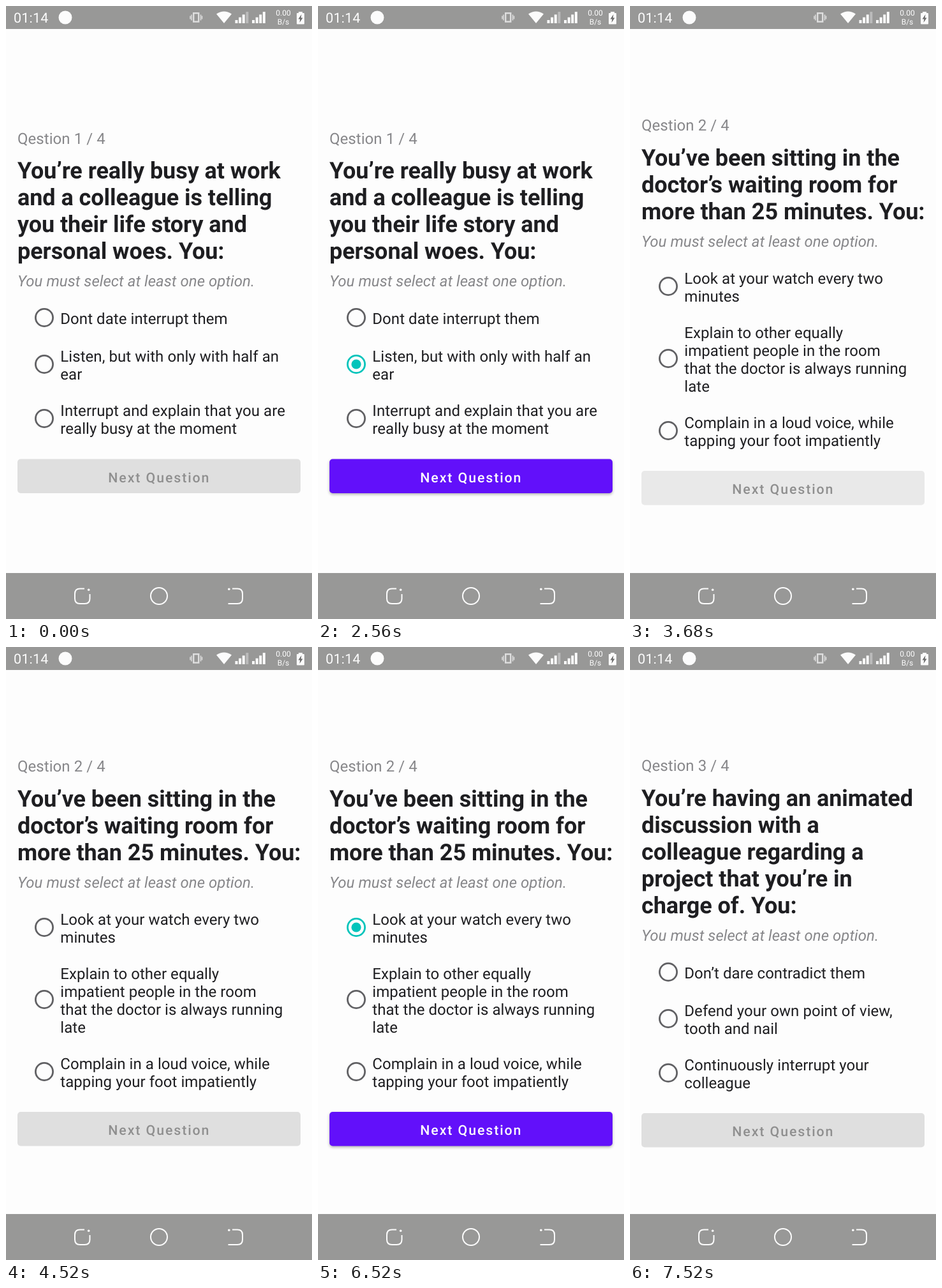
An HTML page with a canvas for the animation above (8 s loop, 480x960 px).

```html
<!DOCTYPE html>
<html lang="en">
<head>
<meta charset="utf-8">
<title>Quiz</title>
<style>
html, body { margin: 0; height: 100%; overflow: hidden; background: #fdfdfd; }
canvas { display: block; width: 480px; height: 960px; }
</style>
</head>
<body>
<canvas id="stage" width="480" height="960"></canvas>
<script>
const ctx = document.getElementById('stage').getContext('2d');
const LOOP = 8000, STEP = 40;
const PAPER = '#fdfdfd', INK = '#1e1e21', MUTED = '#87878a', BAR = '#989897';
const LIGHT = '#fcfcfc', TEAL = '#03c4bb', PURPLE = '#6210fa';

// start: shown from; pick: option tapped; press: button tapped
const questions = [
  { start: 0, label: 215.5, title: 270, button: 709.5,
    heading: ['You’re really busy at work', 'and a colleague is telling', 'you their life story and', 'personal woes. You:'],
    options: [
      [488, 'Dont date interrupt them'],
      [561, 'Listen, but with only with half an', 'ear'],
      [646, 'Interrupt and explain that you are', 'really busy at the moment']],
    pick: { option: 1, from: 2440, to: 2560 }, press: 3480 },
  { start: 3680, settled: 3840, label: 195, title: 250, button: 728,
    heading: ['You’ve been sitting in the', 'doctor’s waiting room for', 'more than 25 minutes. You:'],
    options: [
      [439, 'Look at your watch every two', 'minutes'],
      [552, 'Explain to other equally', 'impatient people in the room', 'that the doctor is always running', 'late'],
      [665, 'Complain in a loud voice, while', 'tapping your foot impatiently']],
    pick: { option: 0, from: 6280, to: 6360 }, press: 7320 },
  { start: 7440, settled: 7520, label: 194, title: 249, button: 730,
    heading: ['You’re having an animated', 'discussion with a', 'colleague regarding a', 'project that you’re in', 'charge of. You:'],
    options: [
      [509, 'Don’t dare contradict them'],
      [582, 'Defend your own point of view,', 'tooth and nail'],
      [667, 'Continuously interrupt your', 'colleague']] }
];

const progress = (t, from, to) => Math.min(1, Math.max(0, (t - from) / (to - from)));

function text(str, x, y, font, color, spacing = 0, align = 'left') {
  ctx.font = `${font} Roboto, sans-serif`;
  ctx.textRendering = 'geometricPrecision';
  ctx.letterSpacing = spacing + 'px';
  ctx.textAlign = align;
  ctx.fillStyle = color;
  ctx.fillText(str, x, y);
}

function box(x, y, w, h, color, r = 0) {
  ctx.fillStyle = color;
  ctx.beginPath();
  ctx.roundRect(x, y, w, h, r);
  ctx.fill();
}

function disc(x, y, r, color) {
  ctx.fillStyle = color;
  ctx.beginPath();
  ctx.arc(x, y, r, 0, 7);
  ctx.fill();
}

function stroke(path, color, width) {
  ctx.strokeStyle = color;
  ctx.lineWidth = width;
  ctx.stroke(new Path2D(path));
}

function ring(x, y, r, color, width) {
  ctx.strokeStyle = color;
  ctx.lineWidth = width;
  ctx.beginPath();
  ctx.arc(x, y, r, 0, 7);
  ctx.stroke();
}

function signal(x, faint) {
  for (let i = 0; i < 4; i++) {
    const h = 5 + i * 4.3;
    box(x + i * 5.6, 27 - h, 4, h, i === 3 && faint ? '#bbb' : LIGHT);
  }
}

function statusBar() {
  box(0, 0, 480, 36, BAR);
  text('01:14', 12, 26, '21.5px', LIGHT, 0.2);
  disc(93, 18, 10.5, LIGHT);

  const pale = '#dedede';
  ctx.strokeStyle = pale;
  ctx.lineWidth = 2.4;
  ctx.strokeRect(294.2, 11.2, 8, 13.4);
  stroke('M291 13.5V22.5M305.5 13.5V22.5M289 15.5V20.5M307.5 15.5V20.5', pale, 1.5);

  ctx.fillStyle = LIGHT;
  ctx.fill(new Path2D('M342 27L330 12.5Q342 4.5 354 12.5Z'));
  signal(359.5, true);
  signal(386, false);
  text('0.00', 435, 15, '12px', LIGHT, 0, 'center');
  text('B/s', 435, 29, '12px', LIGHT, 0, 'center');
  box(459, 9, 6, 4, LIGHT);
  box(456, 11, 12, 17.5, LIGHT, 1);
  ctx.fillStyle = '#6c6c6c';
  ctx.fill(new Path2D('M463.5 13L458.5 20.5H461.3L460.5 26L465.5 18.5H462.7Z'));
}

function navBar() {
  box(0, 888, 480, 72, BAR);
  stroke('M123 912.5H116Q108 912.5 108 920.5V928Q108 936 116 936H123.5Q131.5 936 131.5 928V921', LIGHT, 2);
  disc(129.7, 914.3, 1.8, LIGHT);
  ring(240, 924, 13, LIGHT, 2);
  stroke('M355 912.5H363Q371 912.5 371 920.5V928Q371 936 363 936H348.5', LIGHT, 2);
  disc(349.8, 913.2, 1.8, LIGHT);
}

function option([cy, ...lines], grow, ripple) {
  if (ripple) disc(60, cy, 26, `rgba(110,110,110,${ripple})`);
  ring(60, cy, 13.6, grow > 0 ? TEAL : '#616164', 2.8);
  if (grow > 0) disc(60, cy, 7.6 * grow, TEAL);
  lines.forEach((line, i) =>
    text(line, 85.3, cy + 9.5 - 14 * (lines.length - 1) + 28 * i, '24px', INK, 0.06));
}

function button(y, enabled, glow) {
  ctx.save();
  if (enabled) {
    ctx.shadowColor = 'rgba(0,0,0,.3)';
    ctx.shadowBlur = 4;
    ctx.shadowOffsetY = 2;
  }
  box(18, y, 444, 53.5, enabled ? PURPLE : '#dfdfdf', 5);
  ctx.restore();
  if (glow) box(18, y, 444, 53.5, `rgba(255,255,255,${glow})`, 5);
  text('Next Question', 160.3, y + 36, '500 21.33px', enabled ? PAPER : '#8f8f8f', 1.9);
}

function draw(t) {
  const index = questions.findLastIndex(q => t >= q.start);
  const q = questions[index];
  const tap = q.pick;
  const picked = tap && t > tap.from;

  box(0, 0, 480, 960, PAPER);
  statusBar();
  navBar();

  text(`Qestion ${index + 1} / 4`, 18, q.label, '24px', MUTED, 0.06);
  q.heading.forEach((line, i) => text(line, 18, q.title + 42 * i, 'bold 36px', INK, -0.07));
  text('You must select at least one option.', 18, q.title + 42 * q.heading.length + 1, 'italic 24px', MUTED, 0.04);

  q.options.forEach((o, i) => {
    const mine = tap && tap.option === i;
    const p = mine ? progress(t, tap.from, tap.to) : 0;
    option(o, p, mine && t >= tap.from ? 0.22 * (1 - p) : 0);
  });

  let glow = 0;
  if (q.press && t >= q.press) glow = 0.3 + 0.03 * progress(t, q.press, q.press + STEP);
  else if (q.settled) glow = 0.3 * (1 - progress(t, q.start, q.settled));
  button(q.button, picked, glow);
}

function frame(now) {
  const t = now % LOOP;
  draw(t - t % STEP);
  requestAnimationFrame(frame);
}
requestAnimationFrame(frame);
</script>
</body>
</html>
```
